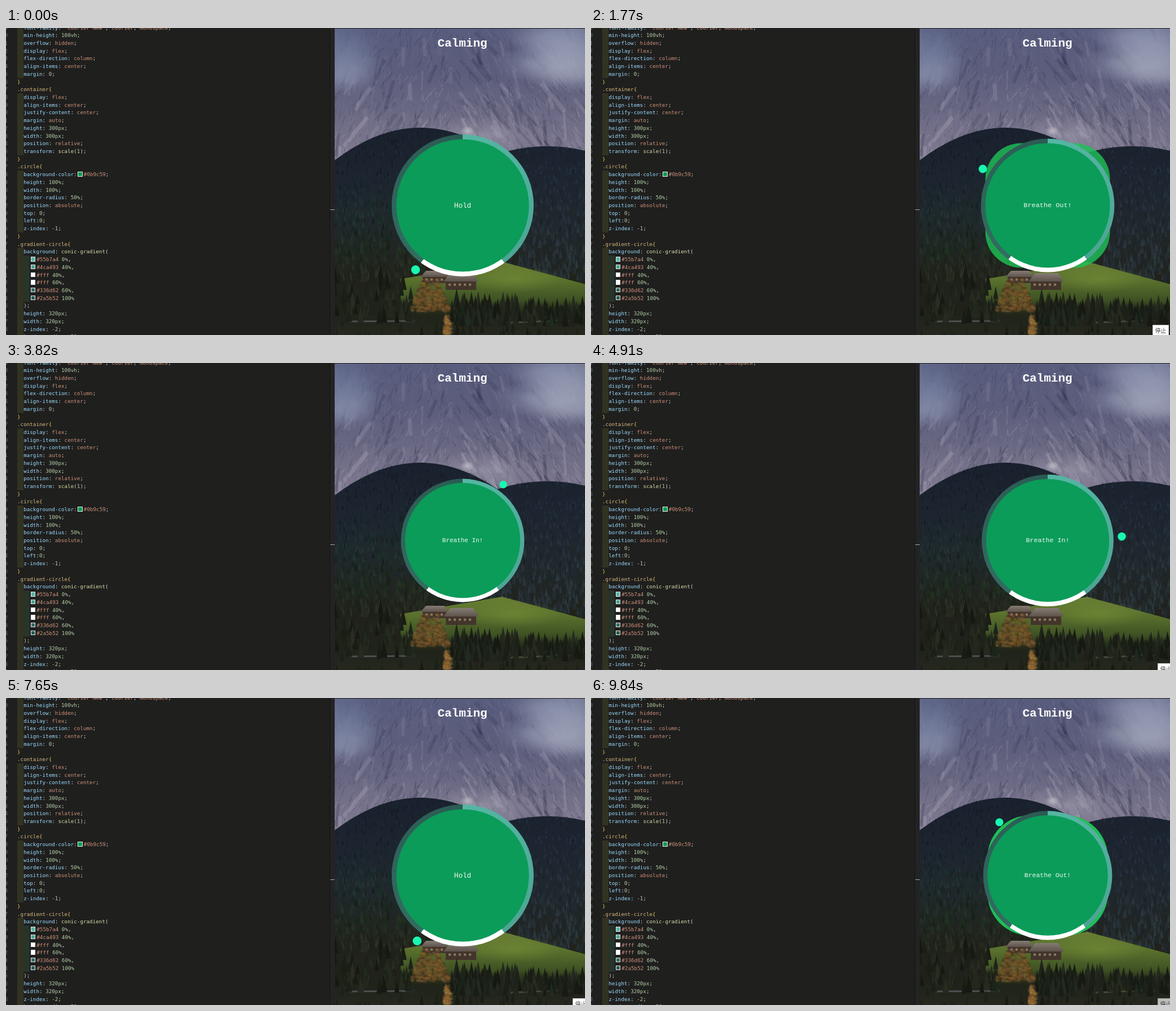
Animation of 1027 by 545 pixels, one loop 9910 ms. Source, as an HTML page with a canvas:

```html
<!DOCTYPE html>
<html lang="en">
<head>
<meta charset="utf-8">
<title>Breathing circle</title>
<style>
html, body { margin: 0; width: 100%; height: 100%; overflow: hidden; background: #1f1f1e; }
#stage { position: absolute; left: 0; top: 0; width: 1027px; height: 545px; overflow: hidden; }
#stage > *, #breath > * { position: absolute; }
#code { left: 0; top: -7.5px; font: 9.26px/13.72px "DejaVu Sans Mono", monospace; color: #d4d4d4; }
.line { position: relative; display: flex; height: 13.72px; padding-left: 20px; white-space: pre; }
.no { position: absolute; right: calc(100% - 3px); color: #697187; }
.indent { background: #323222; }
.indent + .indent { background: #27342a; }
.chip { box-sizing: border-box; width: 8.5px; height: 8.5px; margin: 2px 2px 0 1.5px; border: 1px solid #eee; }
#gutter { left: 574px; top: 0; width: 9px; height: 545px; background: #232324; border-left: 1px solid #141414; box-sizing: border-box; }
#grip { left: 575px; top: 322px; width: 8px; height: 1px; background: #aaa; }
#photo { left: 583px; top: 1px; }
#title { left: 609.5px; top: 15.5px; width: 400px; text-align: center; color: #fff;
  font: bold 21px/24px "Liberation Mono", monospace; }
#breath { left: 809.5px; top: 315.3px; width: 0; height: 0; }
#ring, #disc, #glow { border-radius: 50%; }
#disc, #glow { left: -98.4px; top: -98.4px; width: 196.8px; height: 196.8px; }
#disc { background: #0b9c59; }
#glow { background: #1fc257; }
#ring { left: -105px; top: -105px; width: 210px; height: 210px;
  background: conic-gradient(#55b7a4 0%, #4ca493 40%, #fff 40%, #fff 60%, #336d62 60%, #2a5b52 100%); }
#word { left: -100px; top: -8px; width: 200px; text-align: center; color: #eefaf3;
  font: 10.5px/16px "Liberation Mono", monospace; }
#dot { left: -6.5px; top: -6.5px; width: 13px; height: 13px; border-radius: 50%; background: #19f8b0; }
#tip { box-sizing: border-box; width: 29px; height: 19px; background: #fff; border: 1px solid #ccc; color: #444;
  font: 10px/18px "Noto Sans CJK SC", "Noto Sans CJK", sans-serif; text-align: center; white-space: nowrap; }
</style>
</head>
<body>
<div id="stage">
  <div id="code"></div>
  <div id="gutter"></div>
  <div id="grip"></div>
  <canvas id="photo" width="444" height="544"></canvas>
  <div id="title">Calming</div>
  <div id="breath">
    <div id="glow"></div>
    <div id="ring"></div>
    <div id="disc"></div>
    <div id="word"></div>
    <div id="dot"></div>
  </div>
  <div id="tip">停止</div>
</div>
<script>
const $ = id => document.getElementById(id);

// ---- code editor ----
const source = `  font-family: 'Courier New', Courier, monospace;
  min-height: 100vh;
  overflow: hidden;
  display: flex;
  flex-direction: column;
  align-items: center;
  margin: 0;
}
.container{
  display: flex;
  align-items: center;
  justify-content: center;
  margin: auto;
  height: 300px;
  width: 300px;
  position: relative;
  transform: scale(1);
}
.circle{
  background-color:#0b9c59;
  height: 100%;
  width: 100%;
  border-radius: 50%;
  position: absolute;
  top: 0;
  left:0;
  z-index: -1;
}
.gradient-circle{
  background: conic-gradient(
    #55b7a4 0%,
    #4ca493 40%,
    #fff 40%,
    #fff 60%,
    #336d62 60%,
    #2a5b52 100%
  );
  height: 320px;
  width: 320px;
  z-index: -2;
  border-radius: 50%;`;

const rules = [
  [/^[.][\w-]+/, '#d7ba7d'],
  [/^[{}]/, '#e3c04a'],
  [/^[\w-]+(?=:)/, '#9cdcfe'],
  [/^#\w+/, '#ce9178'],
  [/^-?\d[\w%]*/, '#b5cea8'],
  [/^[\w-]+(?=\()/, '#dcdcaa'],
  [/^('[^']*'|[a-z][\w-]*)/i, '#ce9178'],
  [/^[\s\S]/, '#d4d4d4']
];

function highlight(text) {
  let html = '';
  while (text) {
    const [pattern, color] = rules.find(([p]) => p.test(text));
    const token = text.match(pattern)[0];
    if (token[0] === '#') html += `<span class="chip" style="background:${token}"></span>`;
    html += `<span style="color:${color}">${token}</span>`;
    text = text.slice(token.length);
  }
  return html;
}

$('code').innerHTML = source.split('\n').map((line, i) => {
  const body = line.trimStart();
  const depth = (line.length - body.length) / 2;
  return `<div class="line"><span class="no">${(i + 9) % 10}</span>` +
    '<span class="indent">  </span>'.repeat(depth) + highlight(body) + '</div>';
}).join('');

// ---- mountain scene ----
function paintScene() {
  const LEFT = 583, RIGHT = 1028, BOTTOM = 546;
  const c = $('photo').getContext('2d');
  c.translate(-LEFT, -1);

  let seed = 7;
  const rnd = (a, b) => {
    seed = seed * 16807 % 2147483647;
    return a + (b - a) * seed / 2147483647;
  };
  const anyX = () => rnd(LEFT, RIGHT);
  const lerp = (a, b, k) => a + (b - a) * k;
  const hsl = (h, s, l, a = 1) => `hsla(${h},${s}%,${l}%,${a})`;
  const fade = (y0, y1, ...stops) => {
    const g = c.createLinearGradient(0, y0, 0, y1);
    stops.forEach((s, i) => g.addColorStop(i / (stops.length - 1), s));
    return g;
  };
  // everything below the curve topY(x)
  const land = (topY, from, fill) => {
    c.beginPath();
    c.moveTo(from, BOTTOM);
    for (let x = from; x <= RIGHT; x += 3) c.lineTo(x, topY(x));
    c.lineTo(RIGHT, BOTTOM);
    c.fillStyle = fill;
    c.fill();
  };
  const puff = (x, y, rx, ry, h, s, l, a) => {
    c.save();
    c.translate(x, y);
    c.scale(rx, ry);
    const g = c.createRadialGradient(0, 0, 0, 0, 0, 1);
    g.addColorStop(0, hsl(h, s, l, a));
    g.addColorStop(1, hsl(h, s, l, 0));
    c.fillStyle = g;
    c.fillRect(-1, -1, 2, 2);
    c.restore();
  };
  const tree = (x, y, h, color) => {
    c.beginPath();
    c.moveTo(x, y - h);
    c.lineTo(x + h * .2, y);
    c.lineTo(x - h * .2, y);
    c.fillStyle = color;
    c.fill();
  };
  const streak = (x, y, dx, dy, width, color) => {
    c.strokeStyle = color;
    c.lineWidth = width;
    c.beginPath();
    c.moveTo(x, y);
    c.lineTo(x + dx, y + dy);
    c.stroke();
  };

  const ridge = x => Math.min(177 + 58 * ((x - 735) / 152) ** 2, 210 + 10 * ((x - 960) / 75) ** 2);
  const slope = x => 415 + (x < 880 ? (880 - x) * .17 : (x - 880) * .27);

  // rock face: broad gullies, then fine cracks
  c.fillStyle = fade(0, 240, hsl(234, 17, 42), hsl(236, 15, 42), hsl(245, 11, 47), hsl(255, 9, 53));
  c.fillRect(LEFT, 0, 445, 260);
  for (let i = 0; i < 1500; i++) {
    const coarse = i < 130, x = anyX(), y = rnd(0, 230);
    const len = coarse ? rnd(20, 55) : rnd(3, 18);
    const lean = (x < 790 ? -.35 : .55) + rnd(-.5, .5);
    const dark = rnd(0, 1) < .5;
    streak(x, y, lean * len, len, coarse ? rnd(3, 8) : rnd(.6, 2),
      dark ? hsl(236, 22, 24, rnd(.08, .32)) : hsl(260, 10, 68, rnd(.04, .14 + y / 800)));
  }
  puff(840, 190, 110, 36, 258, 9, 68, .45);
  puff(818, 183, 12, 9, 260, 8, 80, .7);

  // clouds drift in from both upper corners
  for (let i = 0; i < 16; i++) {
    const k = i / 15;
    puff(lerp(575, 625, rnd(0, 1)), lerp(0, 92, k), 62, 30, 226, 18, lerp(44, 62, k), .35);
    puff(lerp(935, 1035, rnd(0, 1)), lerp(0, 85, k), 75, 32, 228, 17, lerp(60, 72, k), .38);
  }

  // forest, far to near
  land(ridge, LEFT, fade(180, 440, hsl(218, 28, 14), hsl(215, 24, 15), hsl(200, 14, 15), hsl(75, 12, 12)));
  for (let i = 0; i < 2200; i++) {
    const k = i / 2200, x = anyX(), east = x > 800;
    const y = lerp(ridge(x) + 3, 455, k);
    const light = (east ? 18 : 15) * rnd(.7, 1.15);
    tree(x, y, rnd(4, 8) + k * 12, hsl(lerp(217, east ? 190 : 70, k * k), lerp(30, 13, k), light));
  }

  // meadow
  land(slope, 700, fade(415, 510, hsl(78, 42, 35), hsl(80, 43, 31), hsl(84, 40, 24), hsl(85, 26, 15)));
  puff(900, 446, 85, 24, 76, 44, 40, .5);

  // chalets
  const chalet = (x, y, w, h) => {
    c.fillStyle = '#43352b';
    c.fillRect(x + 4, y + h * .4, w - 8, h * .6);
    c.fillStyle = fade(y, y + h * .5, '#857c74', '#5d534c');
    c.beginPath();
    c.moveTo(x, y + h * .5);
    c.lineTo(x + w * .2, y);
    c.lineTo(x + w * .85, y);
    c.lineTo(x + w, y + h * .5);
    c.fill();
    c.fillStyle = '#8a7867';
    for (let wx = x + 9; wx < x + w - 9; wx += 9) c.fillRect(wx, y + h * .62, 4, 4);
  };
  chalet(735, 431, 50, 22);
  chalet(776, 435, 62, 30);

  // valley floor and road
  c.fillStyle = fade(485, 545, hsl(85, 20, 11, 0), hsl(80, 16, 12), hsl(75, 12, 14));
  c.fillRect(LEFT, 485, 445, 60);
  streak(610, 521, 115, -1, 3, '#4b5050');
  streak(895, 523, 130, -6, 3, '#454c38');

  // foreground conifers
  for (let i = 0; i < 300; i++) {
    const k = i / 300, x = anyX(), west = x < 722;
    if (!west && x < 790) continue;
    tree(x, lerp(west ? 450 : 494 + (x - 790) * .05, 530, k), rnd(14, 36), hsl(rnd(70, 110), 16, rnd(8, 15)));
  }
  for (let i = 0; i < 70; i++) tree(anyX(), rnd(538, 556), rnd(9, 22), hsl(85, 18, rnd(8, 14)));

  // autumn foliage, wider towards the ground
  const foliage = (x, y, w, h, count, light) => {
    for (let i = 0; i < count; i++) {
      const k = Math.sqrt(rnd(0, 1)), spread = w * (.35 + .65 * k);
      puff(x + rnd(-spread, spread), y + k * h, rnd(2, 6), rnd(2, 5), rnd(28, 40), rnd(35, 60), rnd(.45, 1) * light, .75);
    }
  };
  foliage(752, 441, 36, 62, 420, 37);
  foliage(783, 505, 7, 38, 110, 50);
}
paintScene();

// ---- breathing cycle ----
const LOOP = 9910, CYCLE = 7680, START = 3170;
const BREATH = CYCLE * .4, OUT = 4516;

function breathAt(t) {
  const u = (t - START + CYCLE) % CYCLE;
  if (u < BREATH) return { word: 'Breathe In!', scale: 1 + .2 * u / BREATH, out: 0 };
  if (u < OUT) return { word: 'Hold', scale: 1.2, out: 0 };
  const out = Math.min(1, (u - OUT) / BREATH);
  return { word: 'Breathe Out!', scale: 1.3 - .3 * out, out };
}

const ramp = (t, from) => Math.max(0, Math.min(1, (t - from) / 150));

// the tooltip shows twice, at two places
function tipAt(t) {
  return t < 3500
    ? { left: '996px', top: '527px', opacity: ramp(t, 500) - ramp(t, 2600) }
    : { left: '1005px', top: '533px', opacity: ramp(t, 4600) - .3 * ramp(t, 9690) };
}

function draw(t) {
  const { word, scale, out } = breathAt(t);
  $('breath').style.transform = `scale(${scale})`;
  if ($('word').textContent !== word) $('word').textContent = word;
  $('glow').style.borderRadius = out * 50 + '%';
  $('glow').style.opacity = Math.min(1, out * 1.4);
  $('dot').style.transform = `rotate(${216.5 + t * 360 / CYCLE}deg) translateY(-117.8px)`;
  Object.assign($('tip').style, tipAt(t));
}

const begin = performance.now();
function tick() {
  draw((performance.now() - begin) % LOOP);
  requestAnimationFrame(tick);
}
tick();
</script>
</body>
</html>
```
